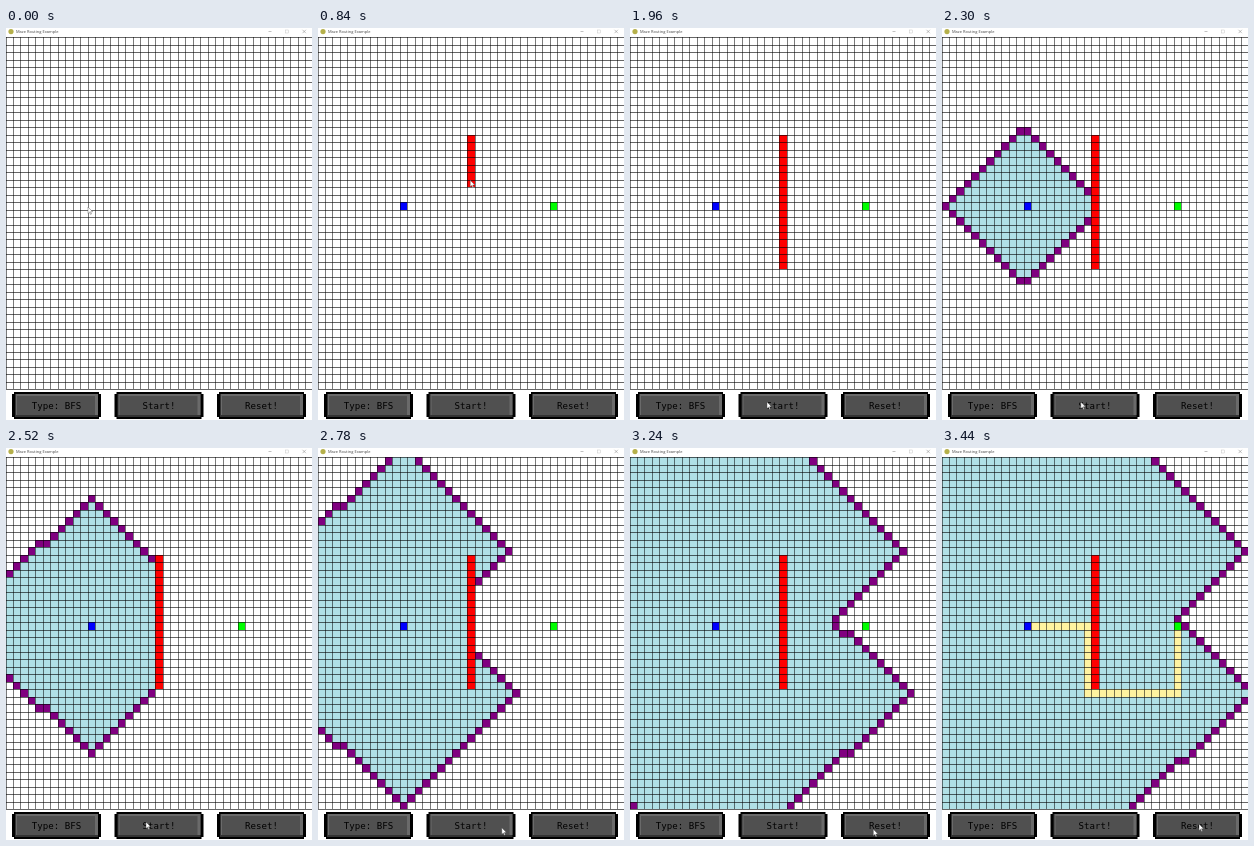
An HTML page with a canvas that plays this animation: 306x392 px, repeating every 3460 ms.

```html
<!DOCTYPE html>
<html lang="en">
<head>
<meta charset="utf-8">
<title>Maze Routing Example</title>
<style>
  html, body { margin: 0; width: 100%; height: 100%; overflow: hidden; background: #fff; }
  canvas { display: block; width: 306px; height: 392px; }
</style>
</head>
<body>
<canvas id="stage" width="306" height="392"></canvas>
<script>
const ctx = document.getElementById('stage').getContext('2d');
const W = 306, H = 392, LOOP = 3460, STEP = 20;
const COLS = 41, ROWS = 47, LEFT = -0.5, TOP = 9.25, CELL = 7.49;
const id = (x, y) => y * COLS + x;
const START = id(11, 22), GOAL = id(31, 22);
const WALL = { col: 20, from: 13, to: 30 };
const BLUE_AT = 60, GREEN_AT = 300, WALL_AT = 620;

// Pointer stops: [time, x, y]
const STOPS = [
  [0, 82, 179], [80, 82, 179], [280, 233, 178], [520, 151.5, 112.5], [620, 151.5, 112.5],
  [1680, 155, 304], [1960, 137, 374], [2520, 140, 374], [3060, 231, 386], [3440, 257, 376]
];
const ARROW = new Path2D('M0 0V6.5L1.5 5.2 2.5 7.4 3.5 7 2.5 4.8 4.6 4.7Z');

function pointerAt(t) {
  const i = Math.max(1, STOPS.findIndex(s => s[0] >= t));
  const [t0, x0, y0] = STOPS[i - 1], [t1, x1, y1] = STOPS[i];
  const p = (t - t0) / (t1 - t0);
  return [x0 + (x1 - x0) * p, y0 + (y1 - y0) * p];
}

// Cells visited by time t; the search speeds up slightly
function visitedAt(t) {
  const u = t - 2520;
  return t < 2120 ? 0 : Math.max(0, Math.round(466.3 + u * (1.2356 + 0.000085 * u)));
}

// Breadth-first search: left, right, up, down
function search() {
  const isWall = (x, y) => x === WALL.col && y >= WALL.from && y <= WALL.to;
  const queue = [START], parent = { [START]: -1 }, pushed = { [START]: 0 };
  let n = 0;
  for (; queue[n] !== GOAL; n++) {
    const c = queue[n], x = c % COLS, y = (c - x) / COLS;
    for (const [dx, dy] of [[-1, 0], [1, 0], [0, -1], [0, 1]]) {
      const u = x + dx, v = y + dy, k = id(u, v);
      if (u < 0 || v < 0 || u >= COLS || v >= ROWS || isWall(u, v) || k in parent) continue;
      parent[k] = c;
      pushed[k] = n;
      queue.push(k);
    }
  }
  const path = [];
  for (let c = parent[GOAL]; c !== START; c = parent[c]) path.push(c);
  return { queue, pushed, path, total: n };
}
const bfs = search();

function rect(color, x, y, w, h) {
  ctx.fillStyle = color;
  ctx.fillRect(x, y, w, h);
}

const gx = i => Math.round(LEFT + i * CELL);
const gy = i => Math.round(TOP + i * CELL);

function paint(cell, color) {
  const x = cell % COLS, y = (cell - x) / COLS;
  rect(color, gx(x), gy(y), gx(x + 1) - gx(x), gy(y + 1) - gy(y));
}

function drawSearch(t) {
  const n = visitedAt(t);
  if (n === 0) return;
  const done = Math.min(n, bfs.total);
  bfs.queue.forEach((cell, i) => {
    if (i < done) paint(cell, '#b0e0e6');
    else if (bfs.pushed[cell] < done) paint(cell, '#800080');
  });
  bfs.path.slice(0, Math.max(0, n - bfs.total)).forEach(cell => paint(cell, '#fff3a0'));
}

function drawWall(t, tipY) {
  if (t < WALL_AT) return;
  const last = t > 1680 ? WALL.to : Math.min(WALL.to, Math.floor((tipY - TOP) / CELL));
  for (let y = WALL.from; y <= last; y++) paint(id(WALL.col, y), '#f00');
}

function drawGrid() {
  for (let i = 0; i <= COLS; i++) rect('rgba(0,0,0,.52)', gx(i), gy(0), 1, gy(ROWS) - gy(0));
  for (let i = 0; i <= ROWS; i++) rect('rgba(0,0,0,.6)', 0, gy(i), W, 1);
}

function drawTitleBar() {
  ctx.fillStyle = '#b5b04a';
  ctx.beginPath();
  ctx.arc(5, 3.6, 2.6, 0, 7);
  ctx.fill();
  ctx.fillStyle = '#444';
  ctx.font = '4px "Open Sans", sans-serif';
  ctx.textAlign = 'left';
  ctx.fillText('Maze Routing Example', 10, 5);
  ctx.lineWidth = 0.4;
  ctx.strokeStyle = '#bbb';
  ctx.strokeRect(279.5, 2, 3, 3);
  ctx.strokeStyle = '#666';
  ctx.stroke(new Path2D('M262.5 3.5h3M296.5 1.8l3.4 3.4m0-3.4l-3.4 3.4'));
}

function drawButton(x, label) {
  rect('#000', x, 366, 89, 23);
  rect('#000', x + 2, 364, 85, 27);
  rect('#333', x + 3, 366, 83, 23);
  rect('#6a6a6a', x + 4, 366, 82, 21);
  rect('#505050', x + 5, 368, 78, 19);
  ctx.fillStyle = '#000';
  ctx.font = '9.1px "DejaVu Sans Mono", monospace';
  ctx.textAlign = 'center';
  ctx.fillText(label, x + 44.5, 381);
}

function drawPointer(x, y) {
  ctx.save();
  ctx.translate(x, y);
  ctx.fillStyle = '#fff';
  ctx.fill(ARROW);
  ctx.strokeStyle = '#444';
  ctx.lineWidth = 0.4;
  ctx.stroke(ARROW);
  ctx.restore();
}

function draw(t) {
  const [x, y] = pointerAt(t);
  rect('#fff', 0, 0, W, H);
  drawSearch(t);
  drawWall(t, y);
  if (t >= BLUE_AT) paint(START, '#00f');
  if (t >= GREEN_AT) paint(GOAL, '#0f0');
  drawGrid();
  drawTitleBar();
  ['Type: BFS', 'Start!', 'Reset!'].forEach((label, i) => drawButton(6 + 102.5 * i, label));
  drawPointer(x, y);
}

const begin = performance.now();
function tick() {
  const t = (performance.now() - begin) % LOOP;
  draw(Math.floor(t / STEP) * STEP);
  requestAnimationFrame(tick);
}
tick();
</script>
</body>
</html>
```
